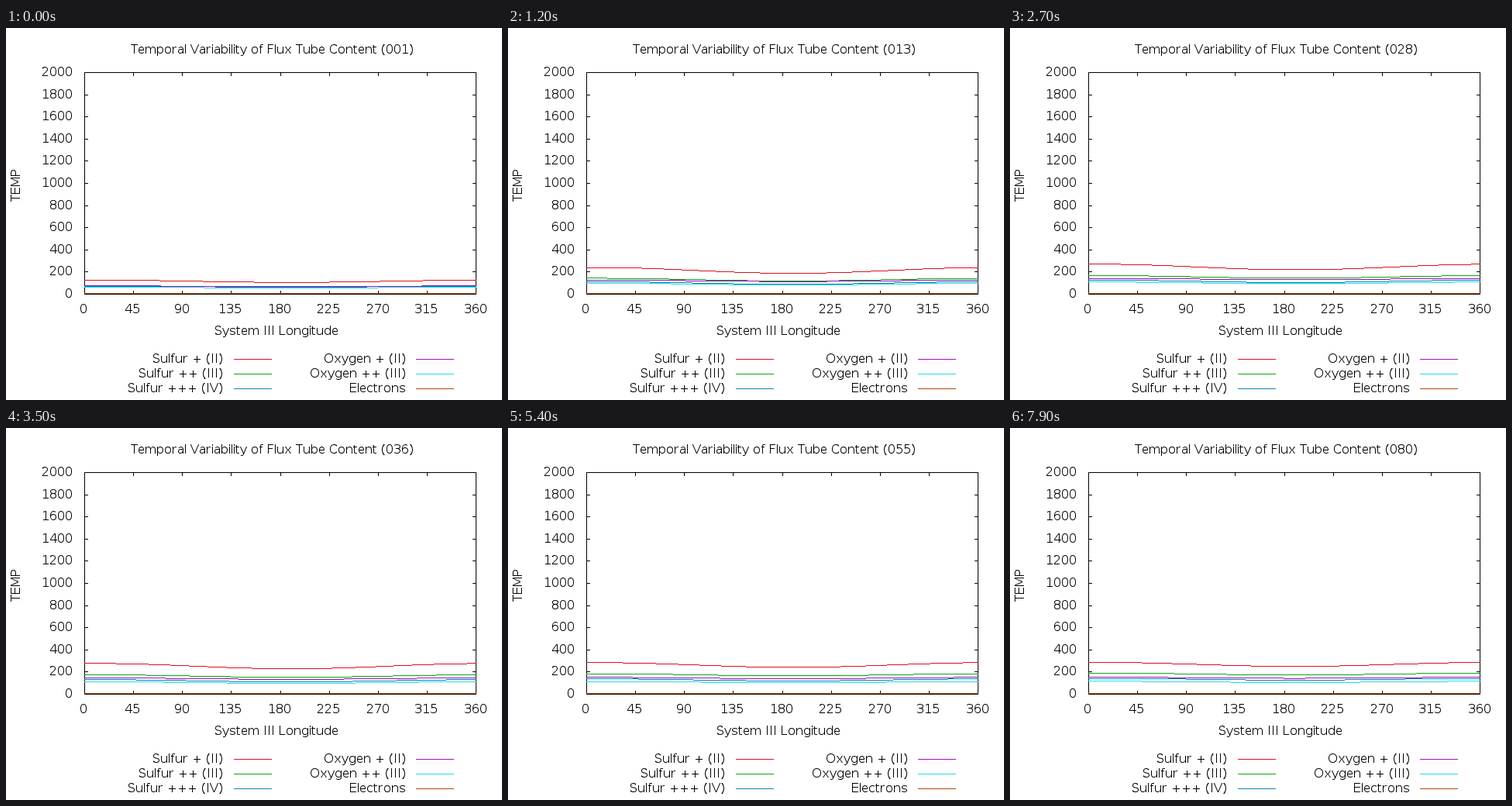
Animation of 640x480 px, one loop 8 s. Source, as a matplotlib script:

```python
import numpy as np
import matplotlib.pyplot as plt
from matplotlib.animation import FuncAnimation

W, H, DPI = 640, 480, 100
FRAMES, INTERVAL = 80, 100
LEFT, RIGHT, TOP, BOTTOM = 101, 606, 57, 343
PX = 72 / DPI

# Full hinting with whole-pixel advances and no kerning
plt.rcParams.update({
    "font.family": "DejaVu Sans",
    "font.size": 16 * PX,
    "text.hinting": "default",
    "text.hinting_factor": 1,
    "text.kerning_factor": 6,
})

# name, colour, first mean, final mean, rise time in frames, swing
SERIES = [
    ("Sulfur + (II)", "#e01018", 117, 273, 12.3, 30),
    ("Sulfur ++ (III)", "#08a812", 71, 191, 20, 14),
    ("Sulfur +++ (IV)", "#0686b8", 68, 144, 27, 13),
    ("Oxygen + (II)", "#a30cbc", 72, 150, 12, 8),
    ("Oxygen ++ (III)", "#1cdfe8", 60, 113, 14, 9),
    ("Electrons", "#b34a0a", 5, 5, 1, 0),
]

fig = plt.figure(figsize=(W / DPI, H / DPI), dpi=DPI, facecolor="white")
ax = fig.add_axes([0, 0, 1, 1])
ax.set_xlim(0, W)
ax.set_ylim(H, 0)
ax.axis("off")

lons = np.arange(0, 361, 15)
cols = np.arange(LEFT, RIGHT + 1)
col_lons = (cols - LEFT) * 360 / (RIGHT - LEFT)


def to_x(lon):
    return np.rint(LEFT + (RIGHT - LEFT) * lon / 360)


def to_y(value):
    return np.rint(BOTTOM - (BOTTOM - TOP) * value / 2000)


def stroke(xs, ys, color="black", cap="projecting"):
    """One pixel wide line through pixel centres."""
    return ax.plot(np.asarray(xs) + 0.5, np.asarray(ys) + 0.5, color=color,
                   lw=PX, snap=False, solid_capstyle=cap)[0]


def label(x, y, text, ha="left", **kw):
    return ax.text(x, y, text, ha=ha, va="baseline", color="black", **kw)


def draw_frame():
    stroke([LEFT, RIGHT, RIGHT, LEFT, LEFT], [TOP, TOP, BOTTOM, BOTTOM, TOP])
    for lon in range(0, 361, 45):
        x = to_x(lon)
        stroke([x, x], [TOP, TOP + 4])
        stroke([x, x], [BOTTOM, BOTTOM - 4])
        label(x - 0.5, 368, str(lon), "center")
    for value in range(0, 2001, 200):
        y = to_y(value)
        stroke([LEFT, LEFT + 4], [y, y])
        stroke([RIGHT, RIGHT - 4], [y, y])
        label(86, y + 5, str(value), "right")
    label(269, 396, "System III Longitude")
    label(19, 223, "TEMP", rotation=90, rotation_mode="anchor")


def draw_key():
    for k, (name, color, *_) in enumerate(SERIES):
        col, row = divmod(k, 3)
        y = 427 + 19 * row
        x = 294 + 235 * col
        label(280 + 236 * col, y + 5, name, "right")
        stroke([x, x + 48], [y, y], color)


def curve(i, first, final, rise, swing):
    mean = final - (final - first) * np.exp(-(i / rise) ** 0.7)
    amp = swing * (1 - 0.65 * np.exp(-i / 5)) * np.exp(-i / 160)
    return mean - amp * np.cos(np.radians(lons - 190))


def pixel_rows(values):
    """Row of each column, as separate one pixel dashes."""
    rows = to_y(np.interp(col_lons, lons, values)) + 0.5
    return np.column_stack([rows, rows, np.full(rows.size, np.nan)]).ravel()


draw_frame()
draw_key()
title = label(161, 33, "")
dash_x = np.column_stack([cols - 0.5, cols + 0.5, cols]).ravel()
lines = [stroke(dash_x, np.full(dash_x.size, np.nan), s[1], "butt")
         for s in SERIES]


def update(i):
    title.set_text(f"Temporal Variability of Flux Tube Content ({i + 1:03d})")
    for line, (_, _, *shape) in zip(lines, SERIES):
        line.set_ydata(pixel_rows(curve(i, *shape)))
    return [title, *lines]


anim = FuncAnimation(fig, update, frames=FRAMES, interval=INTERVAL,
                     repeat=True, repeat_delay=0)
plt.show()
```
